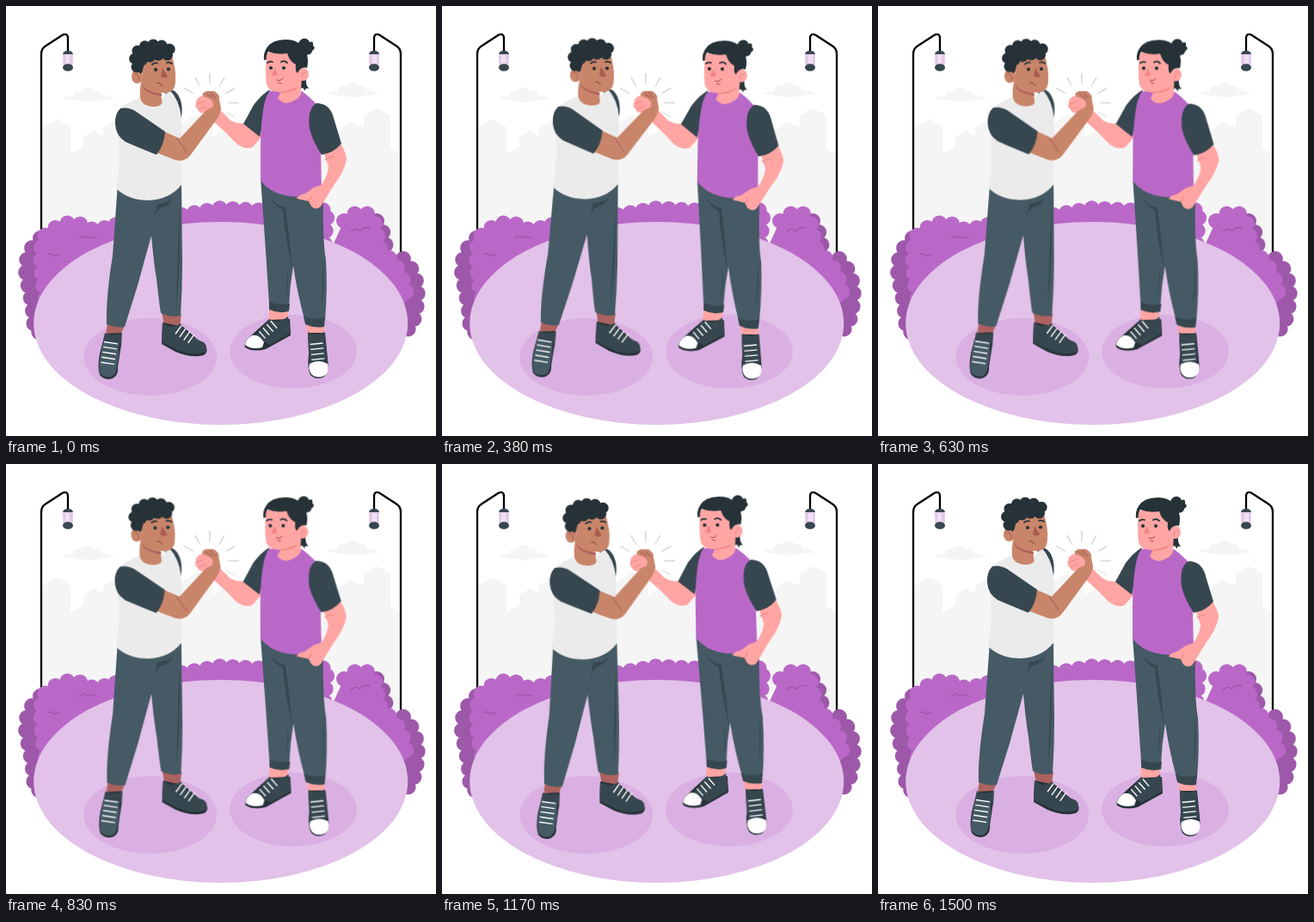
These frames come from a looping animation (500 px wide and 500 px high, 1.54 s). An HTML page:

```html
<!DOCTYPE html>
<html lang="en">
<head>
<meta charset="utf-8">
<title>Friendly handshake</title>
<style>
  html, body { margin: 0; width: 100%; height: 100%; overflow: hidden; background: #fff; }
  svg { display: block; width: 100%; height: 100%; }
  .sway { transform-origin: 250px 243px; animation: sway 1540ms linear infinite; }
  @keyframes sway {
    0%, 97.4%, 100% { transform: rotate(0deg); }
    24.35% { transform: rotate(1deg); }
    73.05% { transform: rotate(-1deg); }
  }
  .line { fill: none; stroke-linecap: round; stroke-linejoin: round; }
  .city { fill: #f5f5f5; }
  .bush { fill: #ba68c8; stroke: #ba68c8; }
  .deep { fill: #9d58a9; stroke: #9d58a9; }
  .hair { fill: #263238; }
  .dark { fill: #37474f; }
  .pants { fill: #455a64; }
  .tan { fill: #c98569; }
  .rust { fill: #ac625f; }
  .pink { fill: #ffa5a3; }
  .blush { fill: #f08486; }
  .purple { fill: #ba68c8; }
  .white { fill: #fff; }
  /* round dots along an outline make leaves and curls */
  .puff { stroke-width: 18; stroke-linecap: round; stroke-dasharray: 0 15; }
  .curls { stroke: #263238; stroke-width: 13; stroke-linecap: round; stroke-dasharray: 0 10; }
  /* a wide dashed stroke makes evenly spaced bars */
  .laces { fill: none; stroke: #fff; stroke-dasharray: 1.4 4.6; }
  .rays { fill: none; stroke: #dcdcdc; stroke-width: 12.5; stroke-dasharray: 1.7 12.83; }
</style>
</head>
<body>
<svg viewBox="0 0 500 500">
  <defs>
    <path id="cloud" class="city" d="M66 108C70 103 76 106 79 104C78 98 85 98 87 99C90 93 101 94 103 99C109 97 112 101 111 104C117 102 124 106 125 109C114 108 110 111 102 111C97 113 92 112 88 110C80 111 75 108 66 108Z"/>
    <g id="lamp">
      <path class="line" d="M72 55V38Q72 31 66 33.500L46 46.500Q41 49.500 41 56V288" stroke="#000" stroke-width="2.300"/>
      <path class="dark" d="M66 57Q66 52 72 52Q78 52 78 57Z"/>
      <path d="M66 56H78L77.500 71H66.500Z" fill="#e3c8ea"/>
      <path d="M69 57H74V69H69Z" fill="#f1e1f4"/>
      <ellipse class="dark" cx="72" cy="71.500" rx="6" ry="4.300"/>
    </g>
  </defs>

  <g class="city">
    <path d="M42 141L60 131.500L75 141V172L90 164V152L102 145L113 151V141L128 133L150 145V270H42Z"/>
    <path d="M190 145L222 126L240 137V152L262 140L300 160V250H190Z"/>
    <path d="M360 160L386 146L400 135L416 141V127L431 119L447 127V166L459 173V290H360Z"/>
  </g>
  <use href="#cloud"/>
  <use href="#cloud" transform="translate(307.500 -5.500)"/>
  <use href="#lamp"/>
  <use href="#lamp" transform="matrix(-1 0 0 1 500 0)"/>

  <g class="puff">
    <path class="deep" d="M40 270Q17 290 25 322Q32 350 33 379L90 380"/>
    <path class="deep" d="M431 250Q446 270 440 300L462 294Q490 320 471 375L430 380"/>
    <path class="bush" d="M46 340Q38 305 42 270Q72 241 96 259Q110 262 127 253L150 300"/>
    <path class="bush" d="M130 254Q190 246 250 235Q320 240 374 237L368 300"/>
    <path class="bush" d="M393 250Q416 230 428 250L436 285Q464 305 466 340L370 300"/>
  </g>
  <path class="line" stroke="#9d58a9" stroke-width="1.500" d="M85 270Q91 265 95 270Q99 267 105 270M49 289Q54 287 56 291Q59 288 62 290M401 262Q408 257 411 262Q416 256 423 258"/>

  <ellipse cx="249.700" cy="369" rx="217.500" ry="118" fill="#e2c2e9"/>
  <g fill="#dab0e2">
    <ellipse cx="167.700" cy="408" rx="77.500" ry="45"/>
    <ellipse cx="334" cy="401.700" rx="74" ry="43"/>
  </g>

  <path class="rays" d="M212.300 99.300A27.750 27.750 0 1 1 260.600 126.600"/>

  <g class="sway">
    <!-- left friend -->
    <g>
      <path class="rust" d="M118 368L138 371L133 383H116ZM181 356L204 358L202 372L184 371Z"/>
      <path class="hair" d="M115 381L109 404Q106 421 109 429Q115 436 124 433Q131 429 130 420L134 394V380Z"/>
      <path class="pants" d="M115 381L110 404Q107 419 109 427Q115 433 123 431Q129 427 129 418Q132 406 131 396L134 381Q124 386 115 381Z"/>
      <path class="dark" d="M115 380Q124 385 135 380L134 397L130 391H114Z"/>
      <path class="laces" stroke-width="16" d="M122 391L118 417"/>
      <path class="hair" d="M182 368L181 393L197 402Q216 410 230 406Q235 403 233 397L206 373Z"/>
      <path class="dark" d="M182 368Q192 377 203 369Q209 383 230 391Q235 396 232 402Q216 408 198 399L181 391Z"/>
      <path class="laces" stroke-width="12" d="M200 376L218 389"/>

      <path class="dark" d="M185 98Q196 94 202 107Q206 116 204 130L190 130Z"/>
      <path class="pants" d="M130 206L124 290Q116 340 117 370Q128 375 138 373L153 325L169 267Q172 300 175 317Q178 345 180 357Q192 363 203 360Q205 330 205 300L204 205Z"/>
      <path class="dark" d="M176 230L168 269L173 247Q174 238 180 235Q190 232 194 224Q185 231 172 230ZM155 238Q147 275 149 306Q147 275 155 238ZM202 239Q199 300 198 350Q203 300 202 239Z"/>
      <path d="M156 106Q143 111 133 119Q126 130 131 155Q133 180 129 213Q143 226 166 226Q190 225 204 208L204 130Q202 110 190 97Q186 104 180 107Q184 116 168 115Q159 114 156 106Z" fill="#ebebeb"/>

      <path class="tan" d="M158 83Q155 98 156 107Q158 116 170 117Q184 117 181 109L180 100L184 84Z"/>
      <path class="rust" d="M158 91Q163 100 181 102L181 105Q175 104 167 101Q159 97 158 91Z"/>
      <path class="tan" d="M158 58H193Q198 75 197 87Q197 100 186 101Q168 102 160 91Q158 80 158 58Z"/>
      <ellipse class="tan" cx="152.500" cy="82" rx="6.500" ry="8"/>
      <path class="line" stroke="#ac625f" stroke-width="1.100" d="M149 79Q155 79 155 87"/>
      <path class="hair curls" d="M152 71Q145 56 158 48Q175 41 190 50Q195 57 186 57Q170 56 158 63"/>
      <path class="hair" d="M149 68L162 62L159 74Q158 82 154 76Z"/>
      <circle class="hair" cx="174" cy="74" r="2.100"/>
      <circle class="hair" cx="189" cy="73.500" r="2.100"/>
      <path class="line" stroke="#263238" stroke-width="1.800" d="M170 68Q173 65.500 176 66.500M187 66Q190 65 193 67"/>
      <path d="M182 72L188 82Q185 85 180 82Z" fill="#a95b50"/>
      <path class="line" stroke="#7c3d38" stroke-width="1" d="M176 90Q178 88 180 91L182 93"/>
    </g>

    <!-- right friend -->
    <g>
      <path class="pink" d="M306 352L328 354L327 367L305 370ZM349 370L370 371V384H351Z"/>
      <path class="hair" d="M305 365L284 384Q276 390 278 397Q287 403 302 399L331 383L330 364Z"/>
      <path class="dark" d="M306 364Q317 370 328 361L331 380L307 394L290 384Z"/>
      <path class="white" d="M286 383Q294 381 300 391L298 397Q285 400 278 394Q278 388 286 383Z"/>
      <path class="laces" stroke-width="11" d="M312 370L297 383"/>
      <path class="hair" d="M351 380L352 405Q350 421 354 429Q361 436 370 431Q376 424 374 410L371 380Z"/>
      <path class="dark" d="M351 379Q360 385 370 379L374 413Q364 411 353 417Z"/>
      <path class="white" d="M353 416Q364 410 374 416Q376 426 370 430Q361 434 355 428Q351 422 353 416Z"/>
      <path class="laces" stroke-width="15" d="M361 392L363 412"/>

      <path class="pants" d="M296 200L302 285L306 347Q318 353 329 349Q330 325 334 302Q339 335 347 364Q359 368 371 365Q374 330 372 295Q368 275 369 220Z"/>
      <path class="dark" d="M306 344Q318 349 330 346L329 355Q317 358 306 353ZM346 361Q359 366 371 362L370 373Q358 375 348 370ZM306 221Q314 233 325 234Q329 265 333 306Q324 265 322 237Q312 233 306 221ZM327 303Q330 320 325 342Q328 320 327 303ZM368 294Q371 325 367 350Q369 322 368 294Z"/>

      <path class="pink" d="M279 136Q270 138 261 133L241 113L233 122L241 134Q256 147 268 160Q278 168 287 164L299 150Z"/>
      <path class="dark" d="M307 97Q297 103 288 115L276 137L295 152L301 130Z"/>
      <path class="purple" d="M317 98L306 99Q301 107 299 121Q296 140 296 165V203Q306 216 323 220Q345 225 367 218L366 165L360 113Q350 103 344 99L332 109Z"/>
      <path class="pink" d="M369 169L389 160Q396 171 396 179Q392 195 382 207L366 233Q361 238 355 233L352 227L338 224Q339 220 348 218L358 211L367 208Q375 195 375 187Z"/>
      <path class="line" stroke="#ee8586" stroke-width="1.100" d="M371 179Q376 175 381 176M352 227Q355 224 355 221"/>
      <path class="dark" d="M361 113Q375 113 380 127L390 160Q381 171 367 173Q357 158 353 143Q350 119 361 113Z"/>

      <path class="hair" d="M340 75L343 86Q343 91 341 97L345 95L348 99Q347 95 352 96Q348 91 349 84Z"/>
      <path class="pink" d="M319 92Q320 102 316 107Q323 116 333 111Q345 106 343 98L344 82Z"/>
      <path class="blush" d="M319 98Q331 99 341 93Q334 101 319 101Z"/>
      <path class="pink" d="M303 55Q301 76 303 91Q306 100 318 100Q334 99 342 89L345 55L325 48Z"/>
      <ellipse class="pink" cx="345.500" cy="79.500" rx="6.500" ry="7.500"/>
      <path class="line" stroke="#ee8586" stroke-width="1.100" d="M344 83Q344 77 349 77"/>
      <path class="hair" d="M300 63Q299 55 303 49Q309 39 325 39Q335 39 340 43Q343 37 349 38Q352 39 353 42Q358 40 357 46Q361 49 356 52Q356 56 350 57Q352 64 350 72Q343 70 339 78Q336 76 337 68Q330 65 327 55Q315 57 305 53Q302 57 303 62Z"/>
      <circle class="hair" cx="308" cy="72" r="2.100"/>
      <circle class="hair" cx="323" cy="72" r="2.100"/>
      <path class="line" stroke="#263238" stroke-width="1.800" d="M304 66Q307 64 310 65M320 65Q324 63 327 66"/>
      <path class="blush" d="M313 72L309 80Q312 82 316 80Z"/>
      <path class="line" stroke="#9b4545" stroke-width="1" d="M315 86Q319 88 322 84M317 89L320 90"/>
    </g>

    <!-- clasped hands -->
    <path class="pink" d="M226 105Q221 108 221 113Q219 118 223 120Q225 126 232 124L240 124L245 113L238 103Z"/>
    <path class="line" stroke="#ee8586" stroke-width="1" d="M222 114L231 111M224 120L233 117"/>
    <path class="tan" d="M184 146L202 154L233 121L240 118Q243 112 237 108L229 105Q227 101 233 99L242 99Q249 103 248 109L250 119Q249 127 244 133L214 174Q207 182 197 179L176 171Z"/>
    <path class="line" stroke="#ac625f" stroke-width="1.100" d="M199 154L210 170M233 102L240 107M238 101L244 107"/>
    <path class="dark" d="M133 119Q142 117 150 122L185 146Q184 162 175 173Q155 165 139 158Q128 151 127 138Q126 126 133 119Z"/>
  </g>
</svg>
</body>
</html>
```
